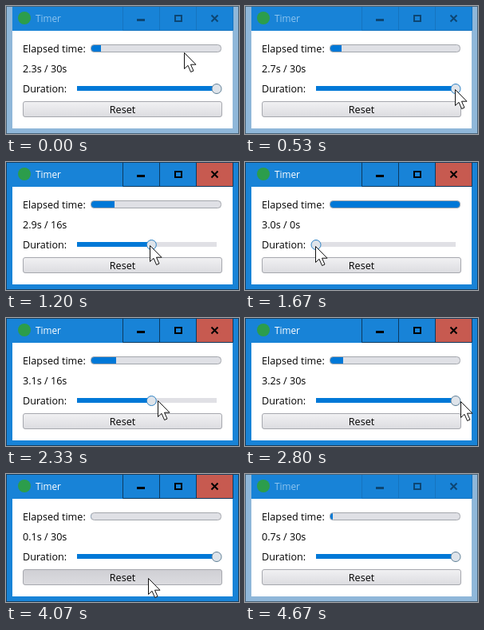
Write an HTML page that moves like this. It is 292x160 px and loops after 4.74 s.

```html
<!DOCTYPE html>
<html lang="en">
<head>
<meta charset="utf-8">
<title>Timer</title>
<style>
  html, body { margin: 0; width: 100%; height: 100%; overflow: hidden; }
  svg { display: block; width: 292px; height: 160px; }
  text { font: 12.6px "Open Sans", "Noto Sans", sans-serif; }
  .title { font-size: 11.8px; }
</style>
</head>
<body>
<svg viewBox="0 0 292 160">
  <defs>
    <linearGradient id="face" x2="0" y2="1">
      <stop offset="0" stop-color="#f1f1f3"/>
      <stop offset="1" stop-color="#dcdce0"/>
    </linearGradient>
    <linearGradient id="down" x2="0" y2="1">
      <stop offset="0" stop-color="#cfcfd4"/>
      <stop offset="1" stop-color="#dcdce0"/>
    </linearGradient>
    <clipPath id="bar"><rect x="106.5" y="48.5" width="163" height="9" rx="4"/></clipPath>
  </defs>

  <rect id="border" width="292" height="160"/>
  <rect x="8" width="276" height="31" fill="#1883d7"/>
  <circle cx="23" cy="15" r="8" fill="#2c9d4b"/>
  <text id="title" class="title" x="37" y="20">Timer</text>
  <rect id="close" x="239" y="1" width="45" height="29" fill="#c75a50"/>
  <path id="frames" d="M146.5 0V30.5H284.5V0M192.5 0V30M238.5 0V30" fill="none"/>
  <g id="glyphs" fill="none" stroke-width="2">
    <path d="M164 17.5H174" stroke-width="3"/>
    <rect x="212" y="12" width="8" height="7"/>
    <path d="M257.5 11.5L265.5 19.5M265.5 11.5L257.5 19.5"/>
  </g>
  <rect id="edge" x=".5" y=".5" width="291" height="159" fill="none"/>

  <rect x="8" y="31" width="276" height="122" fill="#fff"/>
  <text x="21" y="58">Elapsed time:</text>
  <text id="status" x="21" y="83"></text>
  <text x="21" y="108">Duration:</text>

  <rect x="106.5" y="48.5" width="163" height="9" rx="4" fill="#dfe0e5"/>
  <rect id="fill" x="106" y="48" width="0" height="10" fill="#0078d7" clip-path="url(#bar)"/>
  <rect x="106.5" y="48.5" width="163" height="9" rx="4" fill="none" stroke="#a3a6ac"/>

  <rect x="89" y="100" width="175" height="6" fill="#e0e0e5"/>
  <rect id="range" x="89" y="100" height="6" fill="#0078d7"/>
  <circle id="handle" cy="103.5" r="6" fill="#dfe4ea"/>

  <rect id="button" x="21.5" y="119.5" width="249" height="19" rx="2.5" stroke="#a6a8ae"/>
  <text x="146" y="134" text-anchor="middle">Reset</text>

  <path id="cursor" d="M.5 .5V20.5L5 16.3L8.6 24.5L12 23L8.5 15.2H15Z" fill="#fff" stroke="#111" stroke-linejoin="round"/>
</svg>
<script>
const LOOP = 4740, FPS = 15;
const RESET_AT = 3926, RELEASE_AT = 4130;
const $ = id => document.getElementById(id);
const set = (id, attrs) => {
  for (const name in attrs) $(id).setAttribute(name, attrs[name]);
};
const clamp = (v, lo, hi) => Math.min(hi, Math.max(lo, v));

// Pointer path: time, x, y
const path = [
  [0, 223, 58], [500, 263, 104], [690, 263, 104], [1200, 180, 104],
  [1560, 88, 105], [1830, 88, 105], [2330, 189, 103], [2670, 256, 104],
  [2930, 283, 104], [3030, 283, 104], [3400, 187, 119], [3730, 178, 129],
  [4050, 178, 129], [4540, 188, 161]
];
// The clock stalls while the slider is being dragged.
const ticks = [
  110, 230, 350, 470, 590, 1000, 1330, 2100, 2790, 2930,
  3070, 3180, 3290, 3390, 3500, 3600, 3710, 3820
];

function pointer(t) {
  const i = path.findIndex(p => p[0] > t);
  if (i < 0) return path[path.length - 1].slice(1);
  const [t0, x0, y0] = path[i - 1], [t1, x1, y1] = path[i];
  const k = (t - t0) / (t1 - t0);
  return [x0 + (x1 - x0) * k, y0 + (y1 - y0) * k];
}

function duration(t) {
  if (t < 700 || t > 2720) return 30;
  const x = pointer(t - 22)[0] - 2.5;
  return Math.round(clamp((x - 89) / 175, 0, 1) * 30);
}

function elapsed(t) {
  if (t >= RESET_AT) return Math.floor((t - RESET_AT) / 105) / 10;
  return (23 + ticks.filter(at => at <= t).length) / 10;
}

function draw(t) {
  const active = t >= 600 && t < 4600;
  const pressed = t >= RESET_AT && t < RELEASE_AT;
  const hot = t >= 500 && t < 2750;
  const [x, y] = pointer(t);
  const total = duration(t), spent = elapsed(t);
  const knob = 89 + total / 30 * 175;
  const ratio = total ? Math.min(1, spent / total) : 1;

  set("border", { fill: active ? "#1883d7" : "#8fb7d9" });
  set("edge", { stroke: active ? "#1b3f5e" : "#4a6377" });
  set("title", { fill: active ? "#fff" : "#8fc5ef" });
  set("close", { opacity: active ? 1 : 0 });
  set("frames", { stroke: active ? "#0d3a60" : "#1674bf" });
  set("glyphs", { stroke: active ? "#000" : "#0d4673" });

  $("status").textContent = `${spent.toFixed(1)}s / ${total}s`;
  set("fill", { width: Math.round(164 * ratio) });
  set("range", { width: knob - 89 });
  set("handle", { cx: knob, stroke: hot ? "#2a80c4" : "#5f7f96" });
  set("button", { fill: pressed ? "url(#down)" : "url(#face)" });
  set("cursor", {
    transform: `translate(${Math.round(x)} ${Math.round(y)})`,
    visibility: t < 4560 ? "visible" : "hidden"
  });
}

const start = performance.now();
function frame() {
  const t = (performance.now() - start) % LOOP;
  draw(Math.floor((t + 5) * FPS / 1000) % 71 * 1000 / FPS);
  requestAnimationFrame(frame);
}
frame();
</script>
</body>
</html>
```
